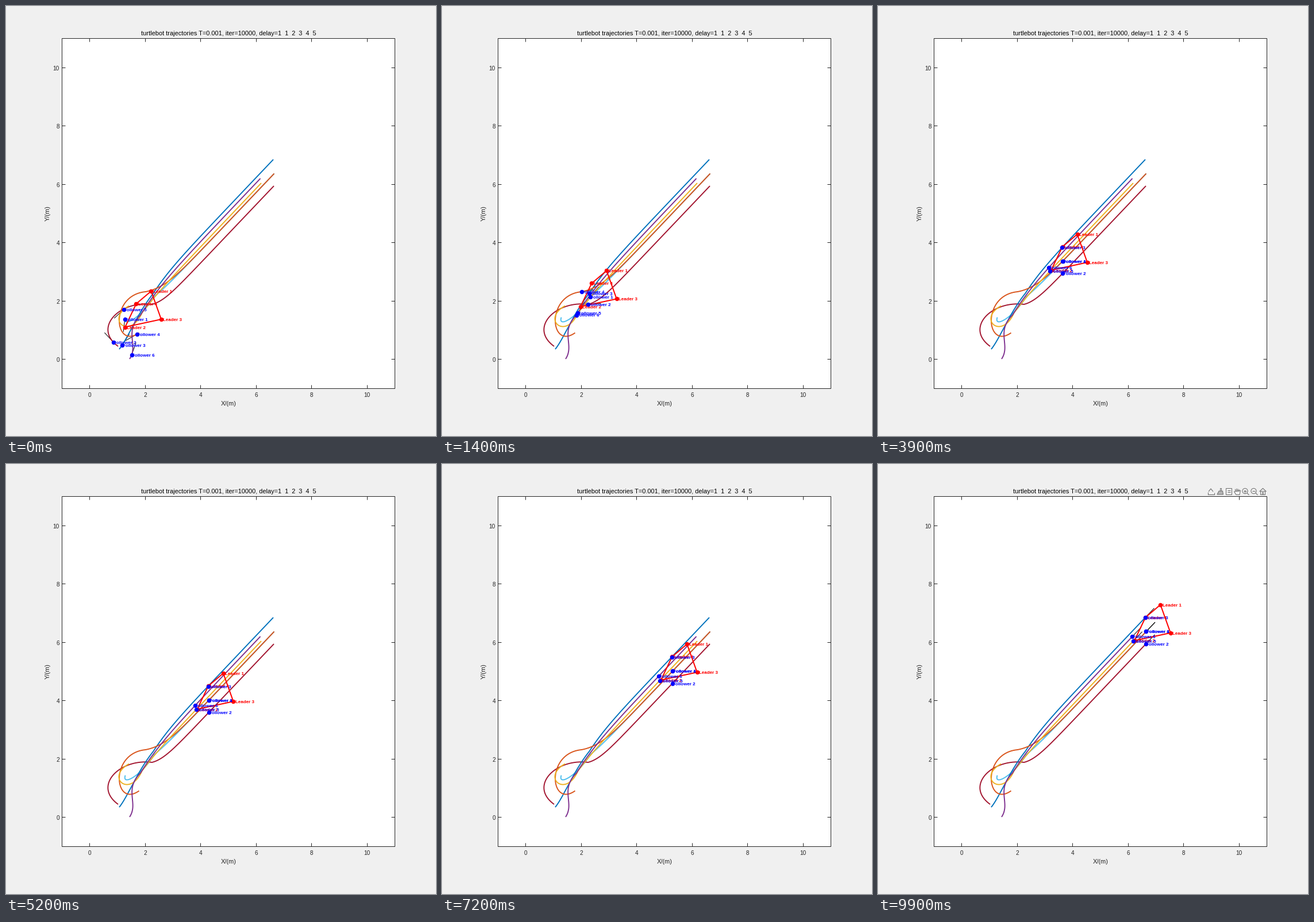
These frames come from a looping animation (748x748 px, 10000 ms). A matplotlib script:

```python
import numpy as np
import matplotlib.pyplot as plt
from matplotlib.animation import FuncAnimation
from matplotlib.patches import Circle, Polygon, Rectangle

SIZE, DPI, FRAMES = 748, 88, 100
PX = 72 / DPI                                # points per pixel
LEFT, TOP, RIGHT, BOTTOM = 97, 56, 676, 665
UX, UY = (RIGHT - LEFT) / 12, (BOTTOM - TOP) / 12
STEP = np.array([0.05 * UX, -0.05 * UY])     # formation motion per frame
JOIN = 14                                    # turn-in over, drift begins
DARK, ICON = "#262626", "#6e6e6e"

plt.rcParams["font.family"] = ["Liberation Sans", "DejaVu Sans"]
fig = plt.figure(figsize=(SIZE / DPI, SIZE / DPI), dpi=DPI, facecolor="#f0f0f0")
ax = fig.add_axes([0, 0, 1, 1])
ax.set_xlim(0, SIZE)
ax.set_ylim(SIZE, 0)
ax.axis("off")


def text(x, y, s, size, color=DARK, **kw):
    kw.setdefault("va", "baseline")
    return ax.text(x, y, s, fontsize=size * PX, color=color, **kw)


def line(xs, ys, color=DARK, width=1.0, z=2, **kw):
    return ax.plot(xs, ys, color=color, lw=width * PX, zorder=z,
                   solid_capstyle="butt", **kw)[0]


def dots(color, z):
    return line([], [], color, z=z, marker="o", ms=7.5 * PX, mew=0, ls="none")


def cubic_through(points, n=400):
    """Cubic curve passing its four points at equal parameter steps."""
    nodes = np.arange(4) / 3
    coef = np.linalg.solve(np.vander(nodes), np.array(points, float))
    return np.vander(np.linspace(0, 1, n), 4) @ coef


class Follower:
    """Turns in along a cubic, then decays onto its place in the formation."""

    def __init__(self, name, color, goal, rate, launch, *points):
        self.goal, self.rate = np.array(goal), rate
        self.turn = cubic_through(points)
        gaps = np.hypot(*np.diff(self.turn, axis=0).T)
        self.dist = np.concatenate([[0], np.cumsum(gaps)])
        self.offset = self.turn[-1] - self.place(JOIN)
        self.speeds = launch, np.hypot(*(STEP - rate * self.offset))

        drift = [self.at(t) for t in np.linspace(JOIN, FRAMES - 1, 200)]
        line(*np.vstack([self.turn, drift]).T, color, 1.9, z=4)
        self.heading = line([], [], "black", 1, z=3)
        self.dot = dots("blue", 8)
        self.label = text(0, 0, name, 8, "blue", weight="bold", zorder=9)

    def place(self, t):
        return self.goal + (t - FRAMES + 1) * STEP

    def at(self, t):
        if t >= JOIN:
            return self.place(t) + self.offset * np.exp(-self.rate * (t - JOIN))
        span = JOIN + 1
        s = (t + 1) / span
        v0, v1 = self.speeds
        d = (self.dist[-1] * s * s * (3 - 2 * s)
             + span * s * (1 - s) * (v0 * (1 - s) - v1 * s))
        return np.array([np.interp(d, self.dist, c) for c in self.turn.T])

    def update(self, t):
        p = self.at(t)
        d = self.at(t + 0.1) - self.at(t - 0.1)
        tip = p + 22.5 * d / np.hypot(*d)
        self.heading.set_data([p[0], tip[0]], [p[1], tip[1]])
        self.dot.set_data([p[0]], [p[1]])
        self.label.set_position((p[0] + 0.5, p[1] + 3))


def draw_axes():
    ax.add_patch(Rectangle((LEFT, TOP), RIGHT - LEFT, BOTTOM - TOP,
                           fc="white", ec=DARK, lw=PX, zorder=1))
    for v in range(0, 11, 2):
        x, y = LEFT + (v + 1) * UX, BOTTOM - (v + 1) * UY
        for edge, inward in ((BOTTOM, -6), (TOP, 6)):
            line([x, x], [edge, edge + inward])
        for edge, inward in ((LEFT, 6), (RIGHT, -6)):
            line([edge, edge + inward], [y, y])
        text(x + 0.5, 680.5, str(v), 10, ha="center")
        text(93, y + 4.8, str(v), 10, ha="right")
    text(387.5, 51, "turtlebot trajectories T=0.001, iter=10000, "
         "delay=1  1  2  3  4  5", 11, "black", ha="center")
    text(387.5, 695, "X/(m)", 11, ha="center")
    text(72.5, 360.5, "Y/(m)", 11, ha="center", va="center", rotation=90)


def draw_toolbar():
    parts = []

    def stroke(*pts):
        parts.append(line(*zip(*pts), ICON, 1.1))

    def shape(kind, *args, fc="none"):
        parts.append(ax.add_patch(kind(*args, fc=fc, ec=ICON, lw=PX, zorder=2)))

    # export
    stroke((574, 49), (574, 52.5), (585, 52.5), (585, 50))
    stroke((575, 48), (579, 43), (583, 48))
    # brush
    shape(Rectangle, (595, 42), 2, 5)
    shape(Polygon, [(593, 47), (599.5, 47), (600.5, 53), (590, 53)], fc="#b4b4b4")
    # data tip
    shape(Rectangle, (605, 42), 10, 11)
    for y in (46, 49):
        stroke((608, y), (613, y))
    # hand
    shape(Polygon, [(619.5, 48), (623, 53.5), (629, 53.5), (630.5, 46)])
    for i in range(4):
        stroke((622 + 2 * i, 48), (621.5 + 2.2 * i, 42.5 + abs(i - 1.3)))
    # zoom in and out
    for cx in (638.5, 653.5):
        shape(Circle, (cx, 47), 4.6)
        stroke((cx + 3.4, 50.4), (cx + 7, 54))
        stroke((cx - 2.5, 47), (cx + 2.5, 47))
    stroke((638.5, 44.5), (638.5, 49.5))
    # home
    stroke((663.5, 48), (669.5, 42.3), (675.5, 48))
    shape(Rectangle, (665, 47), 8, 6)
    shape(Rectangle, (668, 49), 2, 4)
    return parts


draw_axes()
toolbar = draw_toolbar()

# goal, settling rate, first speed, then four points of the turn
followers = [
    Follower("Follower 1", "#4dbeee", (466.5, 291.5), 0.12, 2.7,
             (207.5, 541.5), (213, 549), (234, 535), (258, 505.5)),
    Follower("Follower 2", "#a2142f", (466, 313), 0.17, 11,
             (195, 592), (178, 557), (204, 527.5), (254, 519)),
    Follower("Follower 3", "#0072bd", (465, 267), 0.105, 9,
             (197, 597), (213, 571), (232, 536), (256.5, 499.5)),
    Follower("Follower 4", "#d95319", (466.5, 291.5), 0.15, 3.7,
             (231.5, 568.5), (201, 565), (202, 525), (243, 497)),
    Follower("Follower 5", "#edb120", (444, 308), 0.1, 12,
             (214, 521.5), (196.5, 546), (212, 557.5), (236.5, 534)),
    Follower("Follower 6", "#7e2f8e", (442.5, 300), 0.085, 8.6,
             (215, 614), (220.5, 590), (219.5, 565), (234, 537.5)),
]

# leaders, listed in the order of their outline
ORDER = (1, 4, 2, 3)
START = np.array([(252.5, 496), (226.5, 518), (207.2, 558.5), (270, 545)])
outline = line([], [], "red", 2, z=5)
leaders = dots("red", 6)
names = [text(0, 0, f"Leader {n}", 8, "red", weight="bold", zorder=7)
         for n in ORDER]


def update(k):
    pos = START + k * STEP
    outline.set_data(*np.vstack([pos, pos[:1]]).T)
    leaders.set_data(*pos.T)
    for label, (x, y) in zip(names, pos):
        label.set_position((x + 3.3, y + 3))
    for f in followers:
        f.update(k)
    for part in toolbar:
        part.set_visible(k == FRAMES - 1)
    return []


anim = FuncAnimation(fig, update, frames=FRAMES, interval=100,
                     init_func=lambda: update(0), repeat=True, repeat_delay=0)
plt.show()
```
